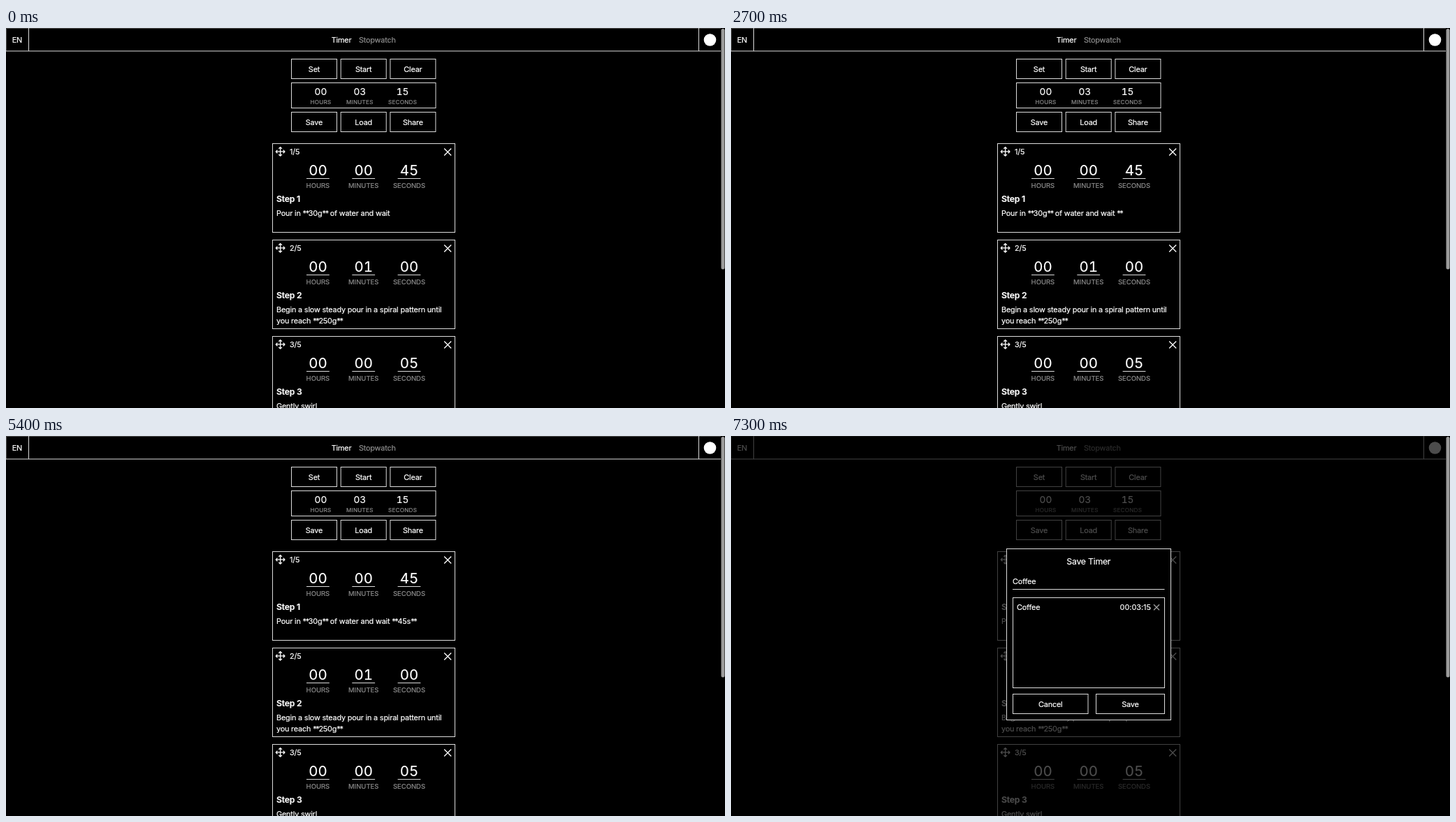
Animation, 1029 px wide and 544 px high, one loop 8 s. Source, as an HTML page:

```html
<!DOCTYPE html>
<html lang="en">
<head>
<meta charset="utf-8">
<title>Timer</title>
<style>
html, body { margin: 0; width: 100%; height: 100%; overflow: hidden; background: #000; }
svg { display: block; width: 1029px; height: 544px; }
text {
  --ink: #fff;
  font: 400 10.89px Inter, "Liberation Sans", sans-serif;
  font-feature-settings: "calt" 0;
  letter-spacing: -.018em;
  fill: var(--ink);
  stroke: var(--ink);
  stroke-width: .2;
  white-space: pre;
}
.star { letter-spacing: -.12em; }
.line { fill: none; stroke: #dcdcdc; stroke-width: 1; }
.icon { fill: none; stroke: #fff; stroke-width: 1.3; }
</style>
</head>
<body>
<svg id="stage" viewBox="0 0 1029 544"></svg>
<script>
const LOOP = 8000;
const stage = document.getElementById('stage');
const GRAY = '#8c8c8c';

function add(parent, tag, attrs) {
  const el = document.createElementNS('http://www.w3.org/2000/svg', tag);
  for (const key in attrs) el.setAttribute(key, attrs[key]);
  parent.appendChild(el);
  return el;
}
// Asterisks are set tighter than the other characters
function write(el, str) {
  el.innerHTML = str.replace(/\*+/g, '<tspan class="star">$&</tspan>');
  return el;
}
const group = () => add(stage, 'g', {});
const path = (g, d, cls = 'line') => add(g, 'path', { d, class: cls });
const box = (g, x, y, w, h) => add(g, 'rect', { x, y, width: w, height: h, class: 'line' });
const label = (g, x, y, str, style = '') => write(add(g, 'text', { x, y, style }), str);
const center = (g, x, y, str, style = '') => label(g, x, y, str, 'text-anchor:middle;' + style);
const caret = (g, y, h) => add(g, 'rect', { y, width: 0.9, height: h, fill: '#fff' });
const ink = (el, color) => el.style.setProperty('--ink', color);

function button(g, x, y, w, name) {
  return [box(g, x, y, w, 28), center(g, x + w / 2, y + 18.4, name)];
}
function cross(g, x, y, r) {
  return path(g, `M${x - r} ${y - r}l${2 * r} ${2 * r}m0 ${-2 * r}l${-2 * r} ${2 * r}`, 'icon');
}
function moveIcon(g, x, y) {
  const tip = 'M-2.3 -4.2L0 -6.3L2.3 -4.2M0 -6.3V0';
  for (let a = 0; a < 360; a += 90)
    path(g, tip, 'icon').setAttribute('transform', `translate(${x} ${y}) rotate(${a})`);
}

const units = ['HOURS', 'MINUTES', 'SECONDS'];
const digits = size => `font-size:${size}px;letter-spacing:0;font-variant-numeric:tabular-nums`;

function card(g, top, num, time, lines) {
  box(g, 381.5, top, 261, 127);
  moveIcon(g, 392.6, top + 11.4);
  label(g, 406, top + 15.4, num + '/5');
  cross(g, 632.2, top + 12, 5);
  units.forEach((unit, i) => {
    const x = [446.4, 511.7, 577][i];
    center(g, x, top + 45, time[i], digits(20.4));
    path(g, `M${x - 16.4} ${top + 50}h32.8`);
    center(g, x, top + 63.2, unit, `font-size:9.53px;letter-spacing:0;--ink:${GRAY}`);
  });
  label(g, 387, top + 83, 'Step ' + num, 'font-size:12.25px;font-weight:600');
  return lines.map((line, i) => label(g, 387, top + 103.4 + i * 16.3, line));
}

// Page
const page = group();
path(page, 'M0.5 33V0.5H1023').style.stroke = '#4a4a4a';
path(page, 'M0 33H1023M32.5 0V33M991.5 0V33');
center(page, 15.8, 20.8, 'EN');
center(page, 480, 20.8, 'Timer');
center(page, 531.3, 20.8, 'Stopwatch', `--ink:${GRAY}`);
add(page, 'circle', { cx: 1007.5, cy: 17, r: 8.8, fill: '#fff' });

[['Set', 'Start', 'Clear'], ['Save', 'Load', 'Share']].forEach((row, r) =>
  row.forEach((name, i) => button(page, 408.5 + i * 70.7, 44.5 + r * 76, 65, name)));
box(page, 408.5, 78.5, 206.5, 36);
units.forEach((unit, i) => {
  const x = [450.4, 506.3, 567.6][i];
  center(page, x, 96.2, ['00', '03', '15'][i], digits(13.6));
  center(page, x, 109.2, unit, `font-size:8.17px;letter-spacing:.025em;--ink:${GRAY}`);
});

const base = 'Pour in **30g** of water and wait';
const [note] = card(page, 165.5, 1, ['00', '00', '45'], [base]);
card(page, 303.5, 2, ['00', '01', '00'],
  ['Begin a slow steady pour in a spiral pattern until', 'you reach **250g**']);
card(page, 441.5, 3, ['00', '00', '05'], ['Gently swirl']);
const noteCaret = caret(page, 258, 13);

// Dialog
const dialog = group();
add(dialog, 'rect', { width: 1023.5, height: 544, fill: '#000', opacity: 0.7 });
box(dialog, 394.5, 161.5, 235, 245).style.fill = '#000';
center(dialog, 511.8, 184.2, 'Save Timer', 'font-size:12.25px');
const field = label(dialog, 403, 212.4, 'Title');
path(dialog, 'M403 219.5H620.5');
box(dialog, 403.5, 231.5, 217, 129);
const row = [label(dialog, 409, 249, 'Coffee'),
  label(dialog, 601, 249, '00:03:15', 'text-anchor:end;letter-spacing:0')];
cross(dialog, 609, 245.3, 4).style.stroke = '#a0a0a0';
button(dialog, 403.5, 369.5, 107.5, 'Cancel');
const [saveBox, saveText] = button(dialog, 522.5, 369.5, 98, 'Save');
const fieldCaret = caret(dialog, 201, 14);
fieldCaret.setAttribute('x', 403);

// Scrollbar
add(stage, 'rect', { x: 1023.5, y: 1, width: 5, height: 344.5, rx: 2.5, fill: '#9c9c9c' });

// time, typed text, caret x (0 = hidden)
const typed = [
  [0, '', 0], [800, '', 550.6], [1300, '', 0], [1700, ' ', 553.6],
  [2000, ' *', 558.6], [2200, ' **', 563.6], [2700, ' **', 0],
  [2800, ' **4', 569.6], [3000, ' **45', 576.6], [3300, ' **45s', 581.6],
  [3700, ' **45s*', 586.6], [3900, ' **45s**', 591.6],
  [4400, ' **45s**', 0], [4900, ' **45s**', 591.6], [5400, ' **45s**', 0]
];

const show = (el, on) => { el.style.display = on ? '' : 'none'; };

function draw(t) {
  const [, text, x] = typed.filter(step => step[0] <= t).pop();
  write(note, base + text);
  show(noteCaret, x > 0);
  noteCaret.setAttribute('x', x);

  const picked = t >= 7300;
  show(dialog, t >= 5800);
  show(fieldCaret, t >= 6400 && t < 6800);
  write(field, picked ? 'Coffee' : 'Title');
  [field, ...row].forEach(el => ink(el, picked ? '#fff' : '#b4b4b4'));
  saveBox.style.stroke = picked ? '#dcdcdc' : '#585858';
  ink(saveText, picked ? '#fff' : '#666');
}

const start = performance.now();
function tick() {
  draw((performance.now() - start) % LOOP);
  requestAnimationFrame(tick);
}
draw(0);
requestAnimationFrame(tick);
</script>
</body>
</html>
```
